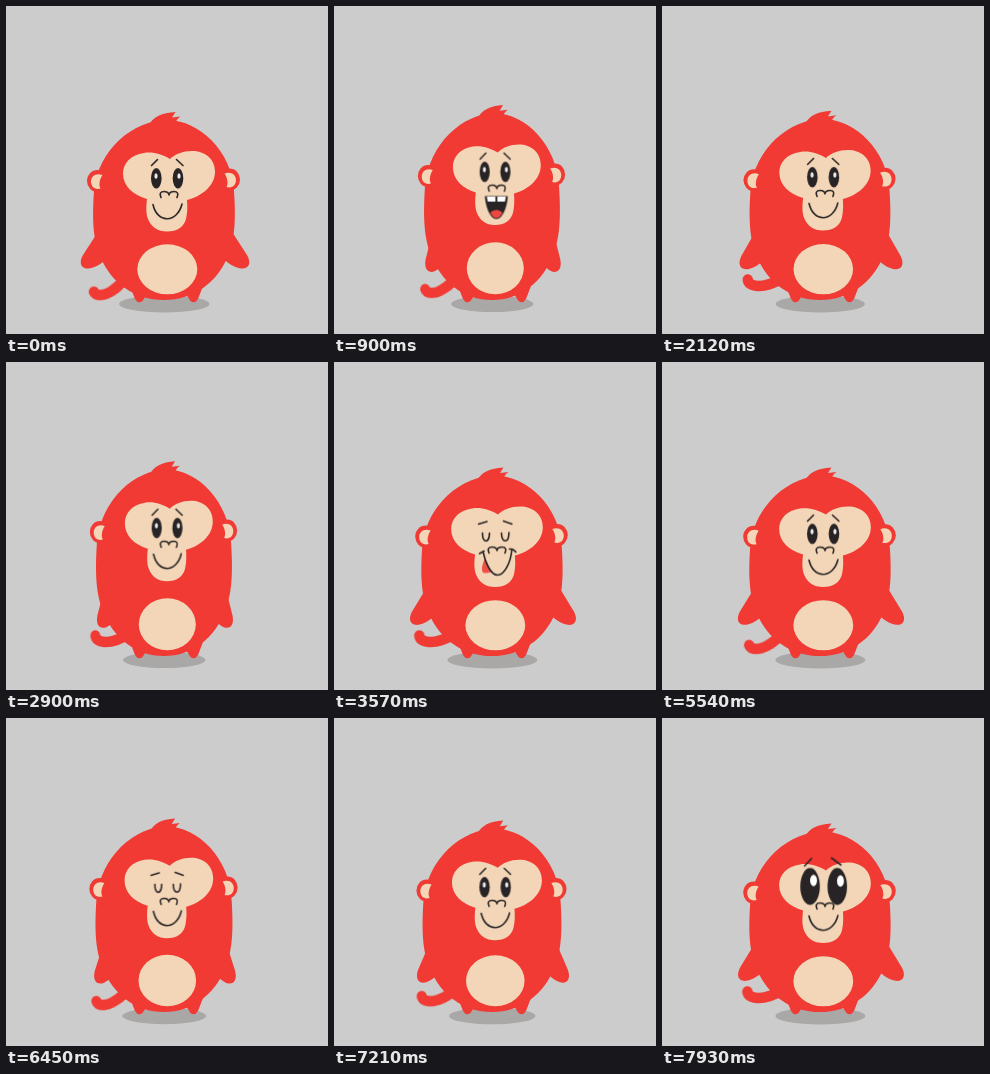
Write an HTML page without scripts that moves like this. It is 322 px wide and 328 px high and loops after 7.99 s.

```html
<!DOCTYPE html>
<html lang="en">
<head>
<meta charset="utf-8">
<title>Breathing monkey</title>
<style>
  @property --p { syntax: "<angle>"; inherits: true; initial-value: 24deg; }

  html, body { margin: 0; width: 100%; height: 100%; overflow: hidden; background: #ccc; }

  /* --p is the breathing phase, --u runs from 0 (squashed) to 1 (stretched) */
  svg {
    --u: calc((.91 - cos(var(--p))) / 1.9);
    display: block; width: 100%; height: 100%;
    animation: breathe 7.99s linear infinite;
  }
  @keyframes breathe { from { --p: 24deg; } to { --p: 1491.4deg; } }

  .red { fill: #f03a33; }
  .skin { fill: #f3d6b8; }
  .ink { fill: #282425; }
  .line { fill: none; stroke: #282425; stroke-width: 1.6; stroke-linecap: round; stroke-linejoin: round; }

  .shadow { transform-origin: 158.3px 298px; transform: scale(calc(1 - .09 * var(--u)), calc(1 - .05 * var(--u))); }
  .body { transform-origin: 158px 294px; transform: scale(calc(1 - .042 * var(--u)), calc(1 + .037 * var(--u))); }
  .head { transform-origin: 159px 180px; transform: translateY(calc(-6.4px * var(--u))) scaleX(calc(1 - .045 * var(--u))); }
  .ears { transform-origin: 157.5px 175px; transform: translateY(calc(-5px * var(--u))) scaleX(calc(1 - .038 * var(--u))); }
  .belly { transform-origin: 161px 263px; transform: translateY(calc(-1px * var(--u))) scale(calc(1 - .05 * var(--u)), calc(1 + .04 * var(--u))); }
  .arm { transform-origin: 102px 215px; transform: rotate(calc(-18deg * var(--u))); }
  .tailbox { transform-origin: 158px 280px; transform: scaleX(calc(1 - .06 * var(--u))); }

  .tail {
    fill: none; stroke: #f03a33; stroke-width: 10.5; stroke-linecap: round;
    transform-origin: 118px 272px; animation: wag 7.99s ease-in-out infinite;
  }
  @keyframes wag {
    0% { transform: rotate(-22deg); }
    11% { transform: rotate(-17deg); }
    26.5%, 45% { transform: rotate(0deg); }
    59%, 81% { transform: rotate(-17deg); }
    99%, 100% { transform: rotate(0deg); }
  }

  .face { animation: 7.99s step-end infinite; }
  .open { animation-name: open; }
  .shut { animation-name: shut; }
  .wide { animation-name: wide; }
  .smile { animation-name: smile; }
  .laugh { animation-name: laugh; }
  .smirk { animation-name: smirk; }
  @keyframes open { 0%, 47%, 82.6% { opacity: 1; } 43.2%, 79%, 92.5%, 100% { opacity: 0; } }
  @keyframes shut { 0%, 47%, 82.6%, 100% { opacity: 0; } 43.2%, 79% { opacity: 1; } }
  @keyframes wide { 0% { opacity: 0; } 92.5%, 100% { opacity: 1; } }
  @keyframes smile { 0%, 18.5%, 67%, 100% { opacity: 1; } 6%, 39% { opacity: 0; } }
  @keyframes laugh { 0%, 18.5%, 100% { opacity: 0; } 6% { opacity: 1; } }
  @keyframes smirk { 0%, 67%, 100% { opacity: 0; } 39% { opacity: 1; } }
</style>
</head>
<body>
<svg viewBox="0 0 322 328">
  <defs>
    <path id="arm" class="red arm" d="M102 212L90 229L77 249C72.500 257 75 263 83 262.500C92 261 100 255 106 246L112 215Z"/>
    <g id="ear">
      <ellipse class="red" cx="91.500" cy="175" rx="10.500" ry="11"/>
      <path class="skin" d="M96.500 169C90 166.500 85 170 85 175.500C85 181 89 184 94.500 182.500C92.500 179 93.500 173.500 96.500 169Z"/>
    </g>
    <path id="foot" class="red" d="M124 280L129 293Q132.500 298.500 136.500 295L143 285Z"/>
  </defs>

  <ellipse class="shadow" cx="158.300" cy="298" rx="45.300" ry="8.500" fill="#aaa8a7"/>

  <g class="tailbox">
    <path class="tail" d="M120 273C111 277 103 280.500 95 280Q85.500 279 85 273.500"/>
  </g>
  <use href="#foot"/>
  <use href="#foot" transform="translate(321 0) scale(-1 1)"/>

  <g class="body">
    <path class="red" d="M161 114C128 114 92 143 88 185C86 215 87 235 95 252C105 276 128 294 158 294C188 294 211 276 221 252C229 235 230 215 228 185C226 145 193 114 161 114Z"/>
    <path class="red" d="M143 119Q149 107 169.500 106L166 111.500L174.500 110.500Q169.500 113.500 169.500 119Z"/>
    <use href="#arm"/>
    <use href="#arm" transform="translate(318 0) scale(-1 1)"/>
  </g>

  <ellipse class="skin belly" cx="161.300" cy="263.300" rx="30" ry="25"/>

  <g class="ears">
    <use href="#ear"/>
    <use href="#ear" transform="translate(315 -1.500) scale(-1 1)"/>
  </g>

  <g class="head">
    <path class="skin" d="M164 153C156 148 146 145.500 138 147C125 149 117 157 117 167.500C117 180 127 189 141 193C140 201 140 208 142 213C145 221 152 225.500 161 225.500C171 225.500 178 221 180 213C181.500 207 181.500 200 181 194C196 190 209 180 209 165.500C209 153 199 145 186 145C177 145 169 148 164 153Z"/>

    <g class="face open">
      <path class="line" d="M145.500 159.500L151.500 153.500M170.500 153.500L177 159.500"/>
      <ellipse class="ink" cx="150.300" cy="172.300" rx="5.300" ry="10.300"/>
      <ellipse class="ink" cx="172" cy="172.300" rx="5.300" ry="10.300"/>
      <g fill="#eee">
        <ellipse cx="150" cy="170" rx="1.600" ry="2.800"/>
        <ellipse cx="173" cy="170" rx="1.600" ry="2.800"/>
      </g>
    </g>

    <g class="face shut">
      <path class="line" d="M144.500 162.500L153 160M169.500 159.500L178 162.500"/>
      <path class="line" d="M148.500 171.500C148 182 155.500 182 155.500 171.500M167.500 171.500C167.500 182 175 182 175 171"/>
    </g>

    <g class="face wide">
      <path class="line" d="M142.500 148.500L149.500 141M169.500 140.500L179 147.500"/>
      <ellipse class="ink" cx="148" cy="169" rx="9.800" ry="18.500"/>
      <ellipse class="ink" cx="175.300" cy="169" rx="9.800" ry="18.500"/>
      <g fill="#fff">
        <ellipse cx="151.500" cy="163" rx="3.500" ry="5.700"/>
        <ellipse cx="178.500" cy="163.500" rx="3.500" ry="5.700"/>
      </g>
    </g>

    <path class="face smile line" d="M147 198.500C151 217.500 171 217.500 176 198"/>

    <g class="face laugh">
      <path class="ink" d="M150.500 196.500H174.500C174 207 169 219.500 162.500 219.500C156 219.500 151 207 150.500 196.500Z"/>
      <path fill="#fff" d="M152.500 197H161.500V202H153.500ZM163.500 197H172.500L171.500 202H163.500Z"/>
      <path fill="#ee4640" d="M156 213Q162.500 207.500 169 213Q166 218.500 162.500 218.500Q159 218.500 156 213Z"/>
    </g>

    <g class="face smirk">
      <path fill="#ee5048" d="M150.500 197.500Q146 208 149 211Q153 212.500 157.500 210Z"/>
      <path class="line" d="M145.500 192L150 189.500M149 190C151 200 156.500 213.500 163.500 213.500C171 213.500 177 200 178 187.500M175.500 187.500Q179.500 187 182 190.500"/>
    </g>

    <path class="line" d="M155 191.500Q152.500 185.500 158 185.500Q162.500 185.500 163 189Q163.500 185.500 168 185.500Q173.500 185.500 171 191.500"/>
  </g>
</svg>
</body>
</html>
```
